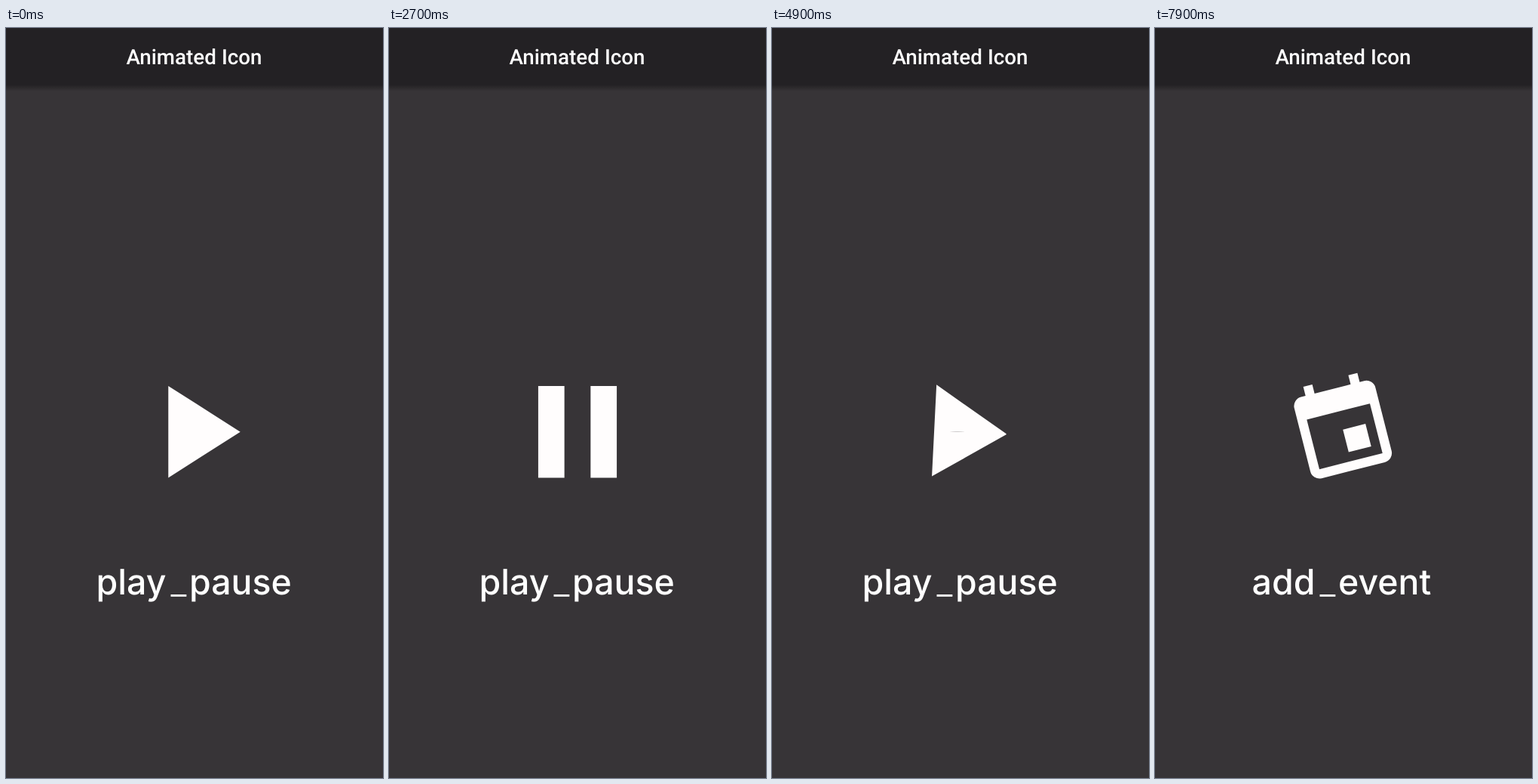
An HTML page for the animation above (8000 ms loop, 500 by 993 pixels).

```html
<!DOCTYPE html>
<html lang="en">
<head>
<meta charset="utf-8">
<title>Animated Icon</title>
<style>
  html, body { margin: 0; width: 100%; height: 100%; overflow: hidden; background: #373437; }
  svg { display: block; width: 100vw; height: 100vh; }
  text { fill: #fff; text-anchor: middle; text-rendering: geometricPrecision; }
  .title { font: 500 27.8px Roboto, sans-serif; }
  .label { font: 500 46.5px Inter, sans-serif; }
  #before { text-anchor: end; }
  #line { font-weight: 300; }
  #after { text-anchor: start; }
</style>
</head>
<body>
<svg viewBox="0 0 500 993">
  <defs>
    <linearGradient id="shade" x2="0" y2="1">
      <stop offset="0" stop-color="#000" stop-opacity=".32"/>
      <stop offset="1" stop-color="#000" stop-opacity="0"/>
    </linearGradient>
  </defs>
  <rect width="500" height="993" fill="#373437"/>
  <rect y="76" width="500" height="8" fill="url(#shade)"/>
  <rect width="500" height="76" fill="#232124"/>
  <text class="title" x="249.5" y="48">Animated Icon</text>
  <circle id="splash" fill="rgb(147,247,181)"/>
  <circle id="highlight" cx="250" cy="534.7" r="161.4" fill="#dcdcdc"/>
  <g fill="#fffdfd">
    <path id="playPause"/>
    <path id="plus" d="M-2-14H2V-2H14V2H2V14H-2V2H-14V-2H-2Z"/>
    <path id="calendar" fill-rule="evenodd" d="M17 12h-5v5h5zM16 1v2H8V1H6v2H5a2 2 0 0 0-2 2V19a2 2 0 0 0 2 2H19a2 2 0 0 0 2-2V5a2 2 0 0 0-2-2H18V1zM19 19H5V8H19z"/>
  </g>
  <g class="label">
    <text id="before" x="212.5" y="750"></text>
    <text id="line" x="229" y="750">_</text>
    <text id="after" x="243" y="750"></text>
  </g>
</svg>
<script>
const LOOP = 8000, STEP = 100, SWITCH = 6400;
const CX = 250, CY = 534.7, RADIUS = 161.4, UNIT = 4.34;
const FADE = 200, GROW = 1000, RUSH = 116, MORPH = 1000;

// Each press: time down, time up, touch offset from the button centre
const taps = [
  { down: 266, up: 1646, dx: 6, dy: 36 },
  { down: 2833, up: 4010, dx: 23, dy: 37 },
  { down: 6566, up: 7340, dx: 12, dy: 36 }
];

const $ = id => document.getElementById(id);
const set = (id, attrs) => {
  for (const name in attrs) $(id).setAttribute(name, attrs[name]);
};
const clamp = x => Math.min(1, Math.max(0, x));

// cubic-bezier(.4, 0, .2, 1)
function ease(x) {
  let lo = 0, hi = 1;
  for (let i = 0; i < 20; i++) {
    const s = (lo + hi) / 2, r = 1 - s;
    if (1.2 * s * r * r + .6 * s * s * r + s ** 3 < x) lo = s; else hi = s;
  }
  return lo * lo * (3 - 2 * lo);
}

function drawInk(t) {
  const tap = taps.find(k => t >= k.down && t < k.up + FADE);
  if (!tap) {
    set('splash', { opacity: 0 });
    set('highlight', { opacity: 0 });
    return;
  }
  const held = Math.min(t, tap.up) - tap.down;
  const released = Math.max(0, t - tap.up);
  const grown = clamp(held / GROW + released / RUSH);
  const fade = 1 - released / FADE;
  set('splash', {
    cx: CX + tap.dx * (1 - grown),
    cy: CY + tap.dy * (1 - grown),
    r: RADIUS * grown,
    opacity: fade
  });
  set('highlight', { opacity: .25 * fade * clamp(held / FADE) });
}

function drawPlayPause(progress) {
  const turn = ease(progress), m = turn ** 1.4;
  const back = -8 - 6 * m, wide = 14 - 2 * m, tip = 12 * m, gap = 4 * m * m;
  const half = s => `M${back} ${s * gap}V${s * wide}L14 ${s * tip}V${s * gap}Z`;
  set('playPause', {
    d: half(-1) + half(1),
    transform: `translate(${CX} ${CY}) rotate(${90 * turn}) scale(${UNIT})`
  });
}

function drawAddEvent(progress) {
  const turn = ease(progress), angle = 90 * (turn - 1);
  const mix = clamp((turn - .25) / .3);
  const size = 2 * UNIT * (.45 + .31 * turn);
  const place = `translate(${CX} ${CY}) rotate(${angle})`;
  set('plus', { transform: `${place} scale(${UNIT})`, opacity: 1 - mix });
  set('calendar', { transform: `${place} scale(${size}) translate(-12 -12.5)`, opacity: mix });
}

function draw(t) {
  const adding = t >= SWITCH;
  const since = i => clamp((t - taps[i].up) / MORPH);
  drawInk(t);
  drawPlayPause(since(0) - since(1));
  drawAddEvent(since(2));
  set('playPause', { display: adding ? 'none' : 'inline' });
  for (const id of ['plus', 'calendar']) set(id, { display: adding ? 'inline' : 'none' });
  $('before').textContent = adding ? 'add' : 'play';
  $('after').textContent = adding ? 'event' : 'pause';
}

const start = performance.now();
function tick() {
  const t = (performance.now() - start) % LOOP;
  draw(Math.floor(t / STEP) * STEP);
  requestAnimationFrame(tick);
}
tick();
</script>
</body>
</html>
```
